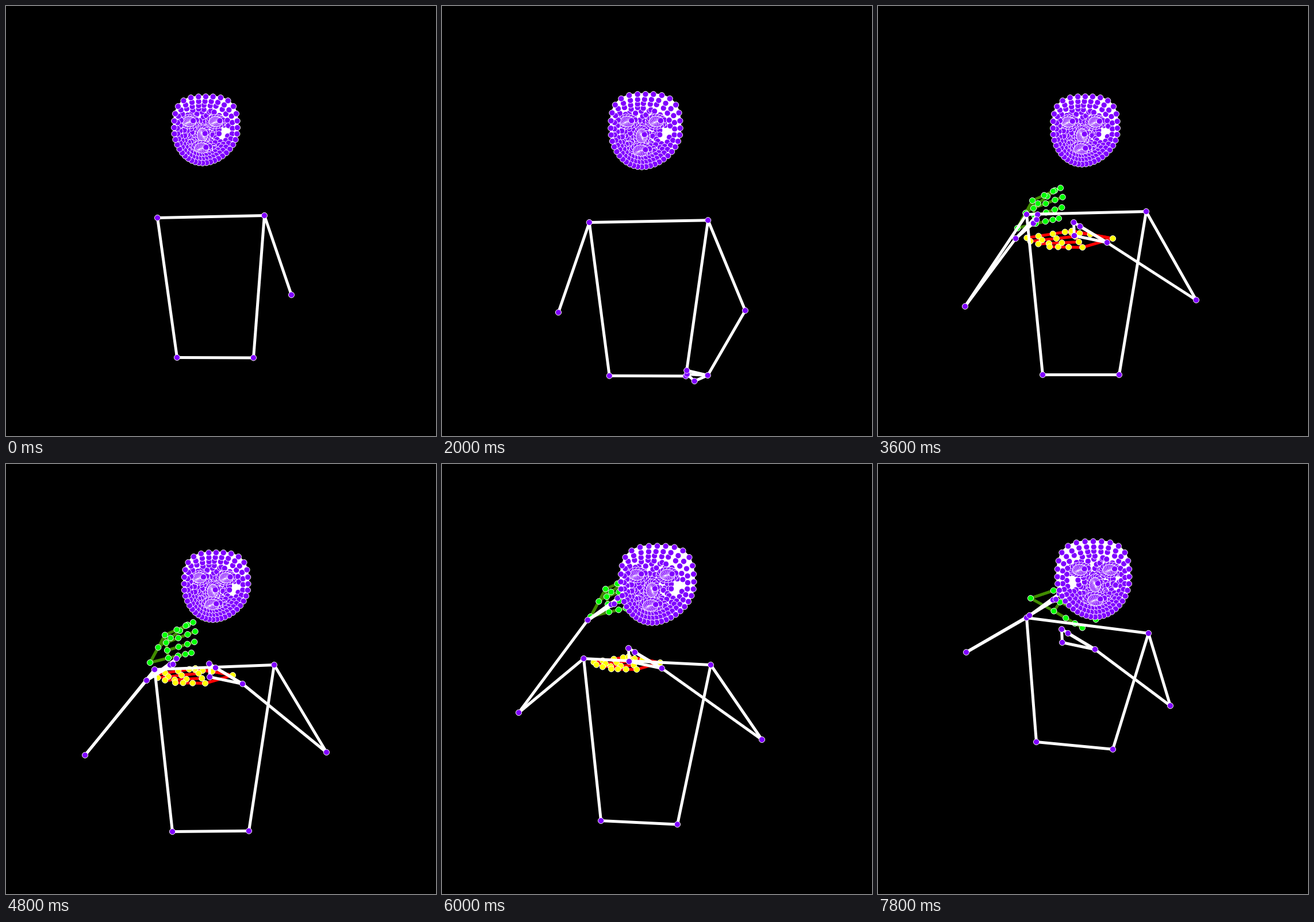
Write an HTML page with a canvas that moves like this. It is 748 px wide and 748 px high and loops after 8000 ms.

```html
<!DOCTYPE html>
<html lang="en">
<head>
<meta charset="utf-8">
<title>Body tracking</title>
<style>
  html, body { margin: 0; width: 100%; height: 100%; overflow: hidden; background: #000; }
  canvas { display: block; width: 100vw; height: 100vh; }
</style>
</head>
<body>
<canvas id="stage" width="748" height="748"></canvas>
<script>
const ctx = document.getElementById('stage').getContext('2d');
const LOOP = 8000, STEP = 200, TAU = Math.PI * 2;
const PURPLE = '#8000ff', WHITE = '#fff';

// Shared key times; each stretch starts slowly if its power is above 1.
const TIMES = [0, 1200, 2800, 3600, 4800, 6000, 7800];
const POWERS = [1, 2, 1, 1, 1, 3];

const lerp = (a, b, k) => a + (b - a) * k;
const mix = (p, q, k) => p.map((v, i) => lerp(v, q[i], k));
const add = (p, x, y) => [p[0] + x, p[1] + y];
const progress = (t, from, to) => Math.min(1, Math.max(0, (t - from) / (to - from)));

// Keys belong to the last key times; earlier the first key holds.
function track(...keys) {
  const skip = TIMES.length - keys.length;
  return t => {
    let i = skip;
    while (i < TIMES.length - 2 && t >= TIMES[i + 1]) i++;
    const k = progress(t, TIMES[i], TIMES[i + 1]) ** POWERS[i];
    return mix(keys[i - skip], keys[i - skip + 1], k);
  };
}

const rShoulder = track([263, 368], [255, 378], [258, 370], [258, 362], [258, 357], [246, 338], [258, 267]);
const lShoulder = track([449, 364], [459, 374], [472, 367], [466, 357], [466, 349], [467, 349], [470, 294]);
const rHip = track([297, 611], [291, 640], [290, 651], [286, 641], [289, 639], [276, 620], [275, 483]);
const rElbow = track([228, 505], [217, 525], [157, 555], [151, 522], [137, 506], [133, 432], [153, 327]);
const lElbow = track([496, 502], [517, 525], [557, 542], [553, 511], [557, 501], [556, 479], [508, 420]);
const rWrist = track([240, 448], [239, 404], [244, 376], [253, 271], [263, 263]);
const lWrist = track([479, 696], [410, 480], [398, 411], [411, 382], [382, 355], [377, 322]);

// Pinky, index and thumb as seen from the wrist, at the start and end of a turn.
const palms = {
  l: { from: 1200, to: 2800, start: [[11, 32], [-14, 31], [-26, 11]], end: [[-57, -12], [-58, -35], [-47, -28]] },
  r: { from: 2800, to: 4800, start: [[24, -26], [29, -44], [30, -36]], end: [[41, -27], [52, -38], [46, -28]] }
};

// Hand shape: base and tip of index and pinky. Place: wrist x, y, angle, size.
const hands = [
  {
    from: 3200, to: LOOP, line: '#418c00', dot: '#00ff00', thumb: .8,
    index: [[26, -48], [75, -70]], pinky: [[32, -8], [72, -17]],
    place: track([242, 386, 0, 1], [250, 345, 0, 1], [258, 265, 0, 1], [265, 233, .75, 1.4])
  },
  {
    from: 3200, to: 7400, line: '#ff0000', dot: '#ffff00', thumb: .15,
    index: [[-65, -12], [-136, -1]], pinky: [[-48, 14], [-100, 13]],
    place: track([408, 404, 0, 1.1], [394, 367, 0, 1], [379, 345, 0, .85], [375, 315, 0, .85])
  }
];

// Head centre, width and sideways turn.
const head = track([347, 215, 110, -.2], [351, 216, 120, -.2], [361, 217, 122, -.25], [360, 216, 112, -.2],
                   [365, 212, 111, -.2], [374, 209, 127, -.28], [374, 200, 125, .1]);

function random(seed) {
  return () => (seed = (seed * 16807) % 2147483647) / 2147483647;
}

// Unit head outline: boxy forehead, narrow chin, wide spacing at the top.
function outline(phi) {
  const a = phi + .3 * Math.sin(phi);
  const x = Math.sin(a), y = -Math.cos(a);
  const n = y < 0 ? 3.1 : 1.9;
  const r = (Math.abs(x) ** n + Math.abs(y) ** n) ** (-1 / n);
  return [x * r, y * r];
}

// Points as [x, y, depth]: loose inner rings, then features, then the rim.
function buildMesh() {
  const rnd = random(41), mesh = [];
  const ring = (scale, count, wobble) => {
    for (let i = 0; i < count; i++) {
      const [x, y] = outline(i / count * TAU);
      const jitter = () => (rnd() - .5) * wobble;
      mesh.push([x * scale + jitter(), y * scale + .1 * (1 - scale) + jitter(), 1 - scale]);
    }
  };
  const feature = (cx, cy, rx, ry) => {
    for (let i = 0; i < 36; i++) {
      const a = i / 18 * TAU, size = i < 18 ? 1 : .55;
      mesh.push([cx + Math.cos(a) * rx * size, cy + Math.sin(a) * ry * size, .5]);
    }
  };
  for (let s = .15; s < .7; s += .1) ring(s, Math.round(8 + s * 32), .09);
  feature(-.42, -.25, .24, .13);
  feature(.42, -.25, .24, .13);
  feature(0, .15, .15, .22);
  feature(0, .55, .26, .14);
  ring(.76, 34, .02);
  ring(.87, 36, 0);
  ring(1, 36, 0);
  return mesh;
}
const mesh = buildMesh();

function line(a, b, color) {
  ctx.strokeStyle = color;
  ctx.lineWidth = 5;
  ctx.beginPath();
  ctx.moveTo(a[0], a[1]);
  ctx.lineTo(b[0], b[1]);
  ctx.stroke();
}

function dot([x, y], color) {
  ctx.beginPath();
  ctx.arc(x, y, 5.1, 0, TAU);
  ctx.fillStyle = color;
  ctx.fill();
  ctx.strokeStyle = WHITE;
  ctx.lineWidth = 1;
  ctx.stroke();
}

function drawHand(hand, t) {
  if (t < hand.from || t >= hand.to) return;
  const [wx, wy, angle, size] = hand.place(t);
  const c = Math.cos(angle) * size, s = Math.sin(angle) * size;
  const put = ([x, y]) => [wx + x * c - y * s, wy + x * s + y * c];
  const wrist = [wx, wy];
  const [index, pinky] = [hand.index.map(put), hand.pinky.map(put)];

  const finger = (base, tip, reach = 1) => [0, .42, .74, 1].map(k => mix(base, tip, k * reach));
  const between = k => finger(mix(index[0], pinky[0], k), mix(index[1], pinky[1], k), 1.1);
  const thumb = finger(mix(wrist, index[0], .55), mix(...index, hand.thumb));
  const fingers = [thumb, finger(...index), between(1 / 3), between(2 / 3), finger(...pinky)];

  fingers.forEach((f, i) => {
    if (i < 2 || i === 4) line(wrist, f[0], hand.line);
    if (i > 1) line(fingers[i - 1][0], f[0], hand.line);
    for (let k = 1; k < 4; k++) line(f[k - 1], f[k], hand.line);
  });
  [wrist, ...fingers.flat()].forEach(p => dot(p, hand.dot));
}

function drawBody(t) {
  const rs = rShoulder(t), ls = lShoulder(t), rh = rHip(t);
  const lh = add(rh, 133, 2 + .4 * (ls[1] - rs[1]));
  const dots = [rs, ls, rh, lh];
  const bone = (a, b) => line(a, b, WHITE);
  bone(rs, ls);
  bone(rh, lh);
  bone(rs, rh);
  bone(ls, lh);

  const arm = (shoulder, elbow, wrist, palm, showElbow, showWrist) => {
    if (t < showElbow) return;
    bone(shoulder, elbow);
    dots.push(elbow);
    if (t < showWrist) return;
    const k = progress(t, palm.from, palm.to);
    const tips = palm.start.map((p, i) => add(wrist, ...mix(p, palm.end[i], k)));
    bone(elbow, wrist);
    tips.forEach(p => bone(wrist, p));
    bone(tips[0], tips[1]);
    dots.push(wrist, ...tips);
  };
  arm(rs, rElbow(t), rWrist(t), palms.r, 600, 2600);
  arm(ls, lElbow(t), lWrist(t), palms.l, 0, 800);
  dots.forEach(p => dot(p, PURPLE));
}

function drawHead(t) {
  const [cx, cy, width, turn] = head(t);
  const r = width / 2, far = -Math.sign(turn);
  const place = ([x, y, depth]) => {
    const chin = y > 0 ? y * y * .5 : 0;
    return [cx + r * (x + turn * (depth + chin)), cy + r * 1.05 * y];
  };
  ctx.fillStyle = ctx.strokeStyle = WHITE;
  ctx.lineWidth = 4;
  ctx.beginPath();
  mesh.slice(-36).map(place).forEach(p => ctx.lineTo(p[0], p[1]));
  ctx.closePath();
  ctx.fill();
  ctx.stroke();
  // The cheek turned towards the viewer stays sparse.
  const sparse = ([x, y]) => Math.hypot(x * far - .63, y - .05) < .13;
  mesh.filter(p => !sparse(p)).forEach(p => dot(place(p), PURPLE));
}

function draw(t) {
  ctx.setTransform(1, 0, 0, 1, 0, 0);
  ctx.fillStyle = '#000';
  ctx.fillRect(0, 0, 748, 748);
  ctx.translate(.5, .5);
  hands.forEach(hand => drawHand(hand, t));
  drawBody(t);
  drawHead(t);
}

const start = performance.now();
let shown = -1;
function tick() {
  const time = (performance.now() - start) % LOOP;
  const t = Math.floor(time / STEP) * STEP;
  if (t !== shown) draw(shown = t);
  requestAnimationFrame(tick);
}
tick();
</script>
</body>
</html>
```
